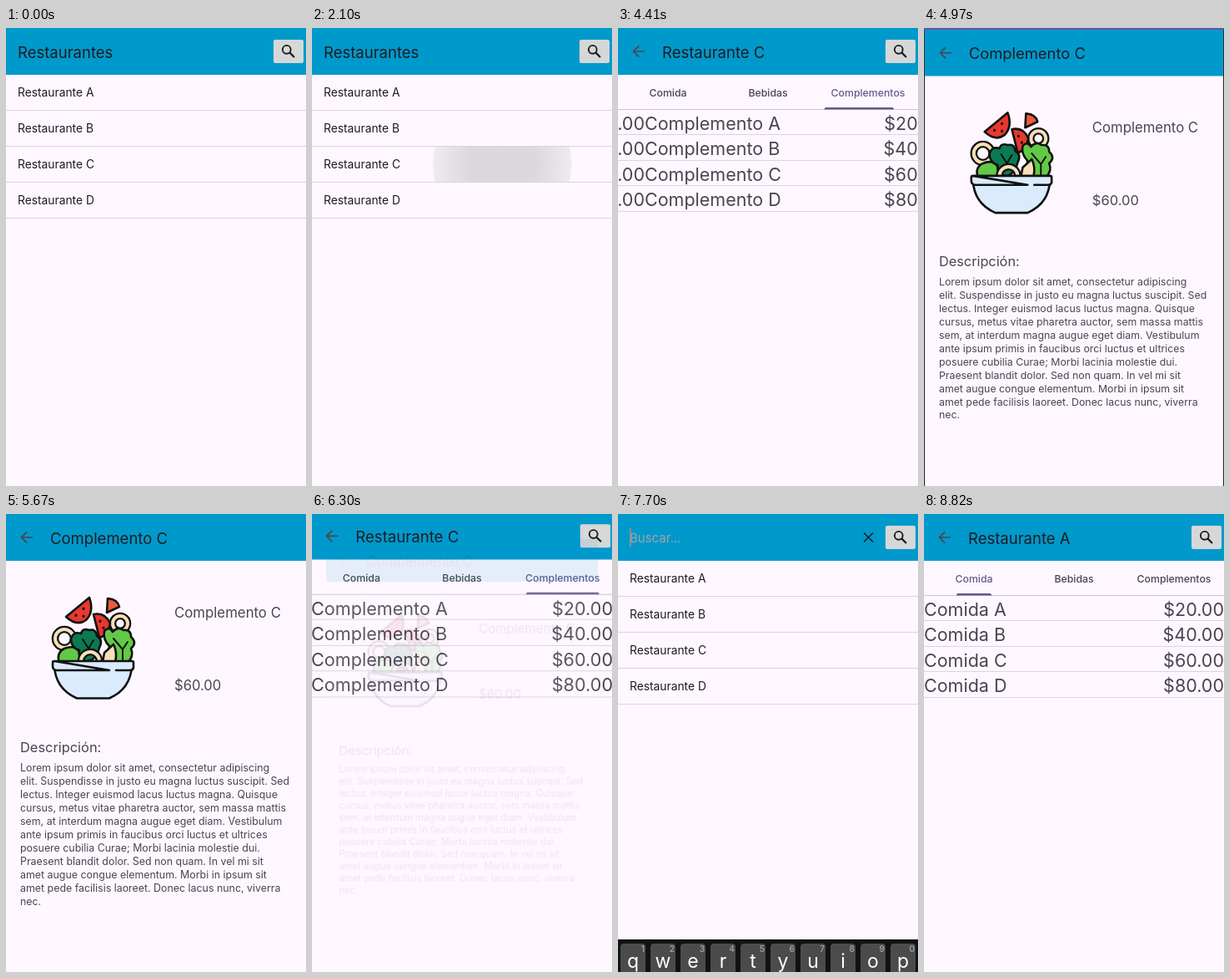
An HTML page with a canvas that plays this animation: 360 by 548 pixels, repeating every 8890 ms.

```html
<!DOCTYPE html>
<html lang="es">
<head>
<meta charset="utf-8">
<title>Restaurantes</title>
<style>
  html, body { margin: 0; height: 100%; overflow: hidden; background: #fef7ff; }
  canvas { display: block; }
</style>
</head>
<body>
<canvas id="stage" width="360" height="548"></canvas>
<script>
const W = 360, H = 548, LOOP = 8890, PIVOT_Y = 320;
const ctx = document.getElementById('stage').getContext('2d');
const INK = '#1d1b20', SOFT = '#49454f', PAPER = '#fef7ff', BLUE = '#0099cc', ACCENT = '#655b8c';

const clamp = v => Math.min(1, Math.max(0, v));
const lerp = (a, b, p) => a + (b - a) * p;
const smooth = p => p * p * (3 - 2 * p);

function rect(x, y, w, h, color, radius = 0) {
  ctx.fillStyle = color;
  ctx.beginPath();
  ctx.roundRect(x, y, w, h, radius);
  ctx.fill();
}

function text(str, x, middle, size, color = INK, align = 'left', weight = 400) {
  ctx.font = `${weight} ${size}px Inter, sans-serif`;
  ctx.textAlign = align;
  ctx.fillStyle = color;
  ctx.fillText(str, x, middle + size * 0.36);
}

function shape(d, fill, stroke = '#111', width = 2.6) {
  const path = new Path2D(d);
  if (fill) { ctx.fillStyle = fill; ctx.fill(path); }
  if (stroke) { ctx.strokeStyle = stroke; ctx.lineWidth = width; ctx.stroke(path); }
}

function ring(x, y, r, color, width = 4) {
  for (const [style, w] of [['#111', width + 4.6], [color, width]]) {
    ctx.beginPath();
    ctx.arc(x, y, r, 0, 7);
    ctx.strokeStyle = style;
    ctx.lineWidth = w;
    ctx.stroke();
  }
}

// Slow-settling curve made of two cubic pieces.
function settle(p) {
  if (p <= 0 || p >= 1) return clamp(p);
  const bez = (u, a, b, c, d) =>
    (1 - u) ** 3 * a + 3 * (1 - u) ** 2 * u * b + 3 * (1 - u) * u * u * c + u ** 3 * d;
  const first = p < 1 / 6;
  const xs = first ? [0, 0.05, 0.1333, 1 / 6] : [1 / 6, 0.2083, 0.25, 1];
  const ys = first ? [0, 0, 0.06, 0.4] : [0.4, 0.82, 1, 1];
  let lo = 0, hi = 1;
  for (let i = 0; i < 24; i++) {
    const mid = (lo + hi) / 2;
    if (bez(mid, ...xs) < p) lo = mid; else hi = mid;
  }
  return bez(lo, ...ys);
}

function searchButton() {
  rect(321, 14, 36, 28, '#d6d7d7', 2);
  ctx.beginPath();
  ctx.arc(336.8, 25.8, 4.9, 0, 7);
  ctx.strokeStyle = INK;
  ctx.lineWidth = 1.9;
  ctx.stroke();
  shape('M340.4 29.4L346 35', null, INK, 2.2);
}

function header(title, back) {
  rect(0, 0, W, 56, BLUE);
  if (back) shape('M32 28H19M25.2 21.3L18.5 28L25.2 34.7', null, SOFT, 1.7);
  if (title) text(title, back ? 53 : 14, 29, 18.5);
}

function listScreen(t) {
  rect(0, 0, W, 900, PAPER);
  const searching = t >= 7350;
  header(searching ? '' : 'Restaurantes', false);
  if (searching) {
    text('Buscar...', 14, 28.5, 15, '#a5a0a6');
    if (t < 7840 || t >= 7980) rect(14, 17, 1.6, 22, '#a08f94');
    shape('M295 22.5L306 33.5M306 22.5L295 33.5', null, INK, 1.5);
  }
  searchButton();
  [...'ABCD'].forEach((letter, i) => {
    text('Restaurante ' + letter, 14, 77.5 + 43 * i, 13.8);
    rect(0, 98 + 43 * i, W, 1, '#dad4dc');
  });
}

const tabs = ['Comida', 'Bebidas', 'Complementos'];
const indicatorHalf = [21, 22.5, 43.5];
const tabPosition = t => t < 3600 || t > 8000 ? 0
  : smooth(clamp((t - 3600) / 440)) + smooth(clamp((t - 4060) / 430));

function menuScreen(name, t) {
  const pos = tabPosition(t), from = Math.min(1, Math.floor(pos));
  rect(0, 0, W, 900, PAPER);
  header('Restaurante ' + name, true);
  searchButton();
  rect(0, 97, W, 1, '#cac4d0');
  const half = lerp(indicatorHalf[from], indicatorHalf[from + 1], pos - from);
  rect(60 + 120 * pos - half, 95, half * 2, 2.6, ACCENT, [2, 2, 0, 0]);
  tabs.forEach((tab, i) => {
    text(tab, 60 + 120 * i, 77.5, 12.3, Math.round(pos) === i ? ACCENT : SOFT, 'center', 450);
    const x = (i - pos) * W;
    if (Math.abs(x) >= W) return;
    [...'ABCD'].forEach((letter, row) => {
      const y = 114 + 30.4 * row;
      text(['Comida ', 'Bebida ', 'Complemento '][i] + letter, x, y, 21.5, SOFT);
      text(`$${20 * (row + 1)}.00`, x + W, y, 21.5, SOFT, 'right');
      rect(x, Math.round(127 + 30.6 * row), W, 1, '#dad4dc');
    });
  });
}

function salad() {
  ctx.lineJoin = ctx.lineCap = 'round';
  ring(137, 131, 9, '#f7dfb8');
  ring(70, 149, 11, '#f7dfb8');
  shape('M72 123L100 100Q106 117 96 127Q85 135 72 123Z', '#e8382f');
  shape('M84 121v.5M93 113v.5M93 122v.5', null, '#111', 3);
  shape('M122 101Q134 102 136 111L121 118Z', '#ee5a3c');
  shape('M105 120Q119 117 125 131Q122 146 112 148Z', '#e8382f');
  shape('M113 128v.5M117 136v.5', null, '#111', 3);
  shape('M118 140Q124 134 128 141Q134 134 141 139Q150 138 150 147Q158 154 150 161Q154 170 146 178H126Q122 168 124 158Q116 150 118 140Z', '#62c946');
  shape('M129 149L140 162V176M140 162L146 153', null, '#111', 2);
  shape('M64 178Q60 166 70 161Q82 156 88 165L96 178Z', '#62c946');
  shape('M78 150Q80 140 90 143Q92 136 100 139Q108 137 109 146Q117 150 112 160Q108 176 96 176Q86 174 88 163Q78 160 78 150Z', '#0b7a52');
  shape('M92 150L99 161L105 151', null, '#111', 2);
  shape('M118 166L129 156Q134 166 131 177H116Z', '#f7dfb8');
  ring(101, 176, 11, '#f7dfb8');
  shape('M58 181H151Q150 209 124 220.5H85Q59 209 58 181Z', '#d9ebfd');
  shape('M58 176H151Q153 176 153 178V184Q152 187 149 187H132M124 187H60Q56 186 56 182V178Q56 176 58 176Z', '#d9ebfd');
  ctx.lineJoin = 'miter';
  ctx.lineCap = 'butt';
}

const description = [
  'Lorem ipsum dolor sit amet, consectetur adipiscing',
  'elit. Suspendisse in justo eu magna luctus suscipit. Sed',
  'lectus. Integer euismod lacus luctus magna. Quisque',
  'cursus, metus vitae pharetra auctor, sem massa mattis',
  'sem, at interdum magna augue eget diam. Vestibulum',
  'ante ipsum primis in faucibus orci luctus et ultrices',
  'posuere cubilia Curae; Morbi lacinia molestie dui.',
  'Praesent blandit dolor. Sed non quam. In vel mi sit',
  'amet augue congue elementum. Morbi in ipsum sit',
  'amet pede facilisis laoreet. Donec lacus nunc, viverra',
  'nec.'
];

function detailScreen() {
  rect(0, 0, W, 900, PAPER);
  header('Complemento C', true);
  salad();
  text('Complemento C', 202, 118, 16.8, SOFT);
  text('$60.00', 202, 205.5, 16.6, SOFT);
  text('Descripción:', 17, 279, 16.4, SOFT);
  description.forEach((line, i) => text(line, 17, 303.5 + 16.04 * i, 12.4, SOFT));
}

function ripple(t, start, top, height) {
  const p = (t - start) / 70;
  if (p < 0 || p >= 2) return;
  const x = lerp(229, 178, Math.min(1, p)), r = lerp(82, 167, p);
  const fade = 1 - clamp(p - 1);
  const glow = ctx.createRadialGradient(x, top + height / 2, 0, x, top + height / 2, r);
  glow.addColorStop(0, `rgba(20,20,20,${0.14 * fade})`);
  glow.addColorStop(0.5, `rgba(20,20,20,${0.14 * fade})`);
  glow.addColorStop(1, `rgba(20,20,20,${0.06 * fade})`);
  ctx.save();
  ctx.beginPath();
  ctx.rect(0, top, W, height);
  ctx.clip();
  ctx.beginPath();
  ctx.arc(x, top + height / 2, r, 0, 7);
  ctx.fillStyle = glow;
  ctx.fill();
  ctx.restore();
}

function keyboard(t) {
  if (t < 7400 || t > 8400) return;
  const shown = 1 - (1 - clamp((t - 7400) / 290)) ** 3;
  const hidden = clamp((t - 8190) / 200) ** 2;
  const y = lerp(lerp(770, 509, shown), 770, hidden);
  if (y > H) return;
  rect(0, y, W, 300, '#111213');
  [...'qwertyuiop'].forEach((key, i) => {
    const x = 3 + 36 * i;
    rect(x, y + 5, 30, 46, '#4b4b4c', 4);
    text(key, x + 15, y + 26, 23, '#fff', 'center');
    text(String((i + 1) % 10), x + 29, y + 11, 10, '#a2a2a2', 'right', 600);
  });
}

// [time, screen, direction]: 1 opens a page, -1 goes back.
const menuC = t => menuScreen('C', t);
const route = [
  [0, listScreen, 0],
  [2400, menuC, 1],
  [4810, detailScreen, 1],
  [6160, menuC, -1],
  [6790, listScreen, -1],
  [8470, t => menuScreen('A', t), 1]
];

function page(screen, t, scale, alpha = 1) {
  ctx.save();
  ctx.translate(W / 2, PIVOT_Y);
  ctx.scale(scale, scale);
  ctx.translate(-W / 2, -PIVOT_Y);
  if (alpha < 1) {
    // Blend the finished page as one layer.
    const layer = fadeLayer(() => screen(t));
    ctx.globalAlpha = alpha;
    ctx.drawImage(layer, 0, 0);
  } else {
    screen(t);
  }
  ctx.restore();
}

const layerCanvas = new OffscreenCanvas(W, H);
function fadeLayer(paint) {
  ctx.save();
  const backup = new OffscreenCanvas(W, H), copy = backup.getContext('2d');
  copy.drawImage(ctx.canvas, 0, 0);
  ctx.setTransform(1, 0, 0, 1, 0, 0);
  paint();
  layerCanvas.getContext('2d').drawImage(ctx.canvas, 0, 0);
  ctx.drawImage(backup, 0, 0);
  ctx.restore();
  return layerCanvas;
}

function draw(t) {
  const i = route.findLastIndex(step => step[0] <= t);
  const [start, screen, direction] = route[i];
  const elapsed = t - start, p = settle(elapsed / 300);
  const fade = clamp((elapsed - 66) / 83);
  if (!direction || elapsed >= 300) {
    screen(t);
  } else {
    const previous = route[i - 1][1];
    rect(0, 0, W, H, '#29262c');
    rect(0, 0, W, 2, '#6750a4');
    if (direction > 0) {
      if (fade < 1) page(previous, start, lerp(1, 1.15, p));
      if (fade > 0) page(screen, t, lerp(0.85, 1, p), fade);
    } else {
      page(screen, t, lerp(1.1, 1, p));
      if (fade < 1) page(previous, start, lerp(1, 0.9, p), 1 - fade);
    }
  }
  ripple(t, 2100, 142, 42);
  ripple(t, 4550, 159, 29);
  ripple(t, 8190, 56, 42);
  keyboard(t);
}

function tick() {
  draw(performance.now() % LOOP);
  requestAnimationFrame(tick);
}
tick();
</script>
</body>
</html>
```
